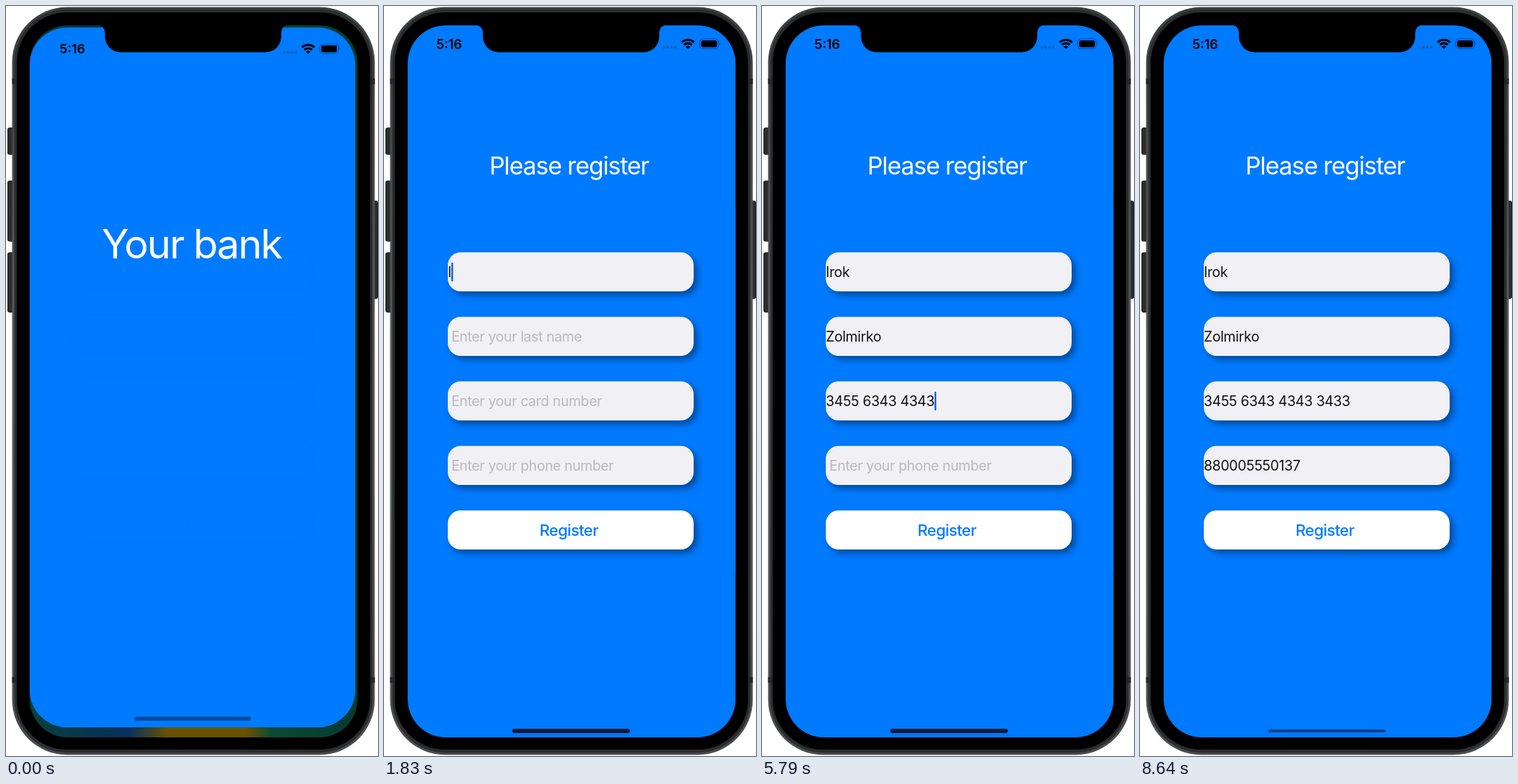
Recreate the animation shown at these times as an HTML page. Size 519 px wide and 1046 px high, loop 8670 ms.

```html
<!DOCTYPE html>
<html lang="en">
<head>
<meta charset="utf-8">
<title>Bank registration</title>
<style>
  html, body { margin: 0; width: 100%; height: 100%; overflow: hidden; background: #fff; }
  svg { display: block; width: 519px; height: 1046px; }
  text { font-family: Inter, Roboto, sans-serif; white-space: pre; }

  .screen, .content, .title, .bar, .box, .tint, #tone stop { animation: 8670ms linear infinite; }
  .screen { transform-origin: 33px 203px; animation-name: open-screen; }
  .content { transform-origin: 227px 333px; animation-name: open-content; }
  .title { animation-name: leave; font-size: 57px; letter-spacing: -2px; fill: url(#tone); }
  #tone .top { animation-name: cool; }
  .bar { transform-origin: 261px 1011px; animation-name: bar; }

  .tint { animation-name: tint; }
  .head { font-size: 34px; letter-spacing: -1.1px; --mid: #1ba9ff; --end: #fff; }
  .box { animation-name: tint, shade; --mid: #14acff; --end: #f1f0f5; }
  .button { --end: #fff; }
  .hint, .typed { font-size: 19.4px; letter-spacing: -.3px; }
  .hint { --mid: #0c89dc; --end: #b9b9be; }
  .typed { fill: #111; }
  .action { font-size: 22px; font-weight: 500; letter-spacing: -.6px; fill: #007aff; }
  .clock { font-size: 18px; font-weight: 600; }
  .caret { fill: #0b62dc; }
  .mark { fill: #bcd4ea; }

  @keyframes open-screen {
    0%, .69% { transform: scale(.993, .983); }
    3.11%, 100% { transform: none; }
  }
  @keyframes open-content {
    0%, .69% { transform: scale(.988, .975); }
    3.11%, 100% { transform: none; }
  }
  @keyframes tint {
    0%, 2.77% { fill: #007aff; }
    3.81%, 4.49% { fill: var(--mid); }
    5.54%, 100% { fill: var(--end); }
  }
  @keyframes shade {
    0%, 2.77% { filter: drop-shadow(5px 5px 5px rgba(0, 0, 0, 0)); }
    3.81%, 4.49% { filter: drop-shadow(5px 5px 5px rgba(0, 0, 0, .13)); }
    5.54%, 100% { filter: drop-shadow(5px 5px 5px rgba(0, 0, 0, .4)); }
  }
  @keyframes cool {
    0%, 2.77% { stop-color: #fff; }
    3.81%, 100% { stop-color: #7cc8ff; }
  }
  @keyframes leave {
    0%, 4.49% { opacity: 1; }
    5.54%, 100% { opacity: 0; }
  }
  @keyframes bar {
    0%, .69% { fill: #0048a0; transform: none; }
    3.11%, 99.2% { fill: #0d1c38; transform: none; }
    99.3%, 100% { fill: #0b3f86; transform: scaleY(.7); }
  }
</style>
</head>
<body>
<svg viewBox="0 0 519 1046">
  <defs>
    <linearGradient id="tone" gradientUnits="userSpaceOnUse" x1="0" y1="318" x2="0" y2="343">
      <stop class="top" offset=".3" stop-color="#fff"/>
      <stop offset="1" stop-color="#fff"/>
    </linearGradient>
    <linearGradient id="home">
      <stop offset="0" stop-color="#064038"/>
      <stop offset=".3" stop-color="#07305c"/>
      <stop offset=".42" stop-color="#685200"/>
      <stop offset=".66" stop-color="#685200"/>
      <stop offset=".74" stop-color="#0b4a32"/>
      <stop offset="1" stop-color="#063a30"/>
    </linearGradient>
    <linearGradient id="rim" x2="0" y2="1">
      <stop offset="0" stop-color="#3d3f40"/>
      <stop offset=".5" stop-color="#5c5e5f"/>
      <stop offset="1" stop-color="#4a4c4d"/>
    </linearGradient>
    <clipPath id="glass"><rect x="33" y="27" width="457.500" height="993" rx="53"/></clipPath>
  </defs>

  <g fill="#2b2e30" stroke="#17191a">
    <rect x="2.500" y="170" width="10" height="37" rx="2"/>
    <rect x="2.500" y="244" width="10" height="84" rx="2"/>
    <rect x="2.500" y="344" width="10" height="83" rx="2"/>
    <rect x="508" y="272" width="10.500" height="136" rx="2"/>
  </g>
  <rect x="8.500" y="1.500" width="506" height="1043" rx="77" fill="url(#rim)"/>
  <rect x="11.500" y="4.500" width="500" height="1037" rx="74" fill="#2a2c2d"/>
  <g fill="#242627">
    <rect x="8.500" y="101" width="7" height="8"/>
    <rect x="507.500" y="101" width="7" height="8"/>
    <rect x="8.500" y="936" width="7" height="8"/>
    <rect x="507.500" y="936" width="7" height="8"/>
  </g>
  <rect x="15" y="9" width="493" height="1028" rx="70"/>

  <g clip-path="url(#glass)">
    <rect x="33" y="27" width="458" height="993" fill="url(#home)"/>
    <rect class="screen" x="33" y="27" width="457.500" height="993" rx="53" fill="#007aff"/>
    <g class="content">
      <text class="clock" x="73" y="59.500">5:16</text>
      <g fill="#1763bd">
        <circle cx="390.500" cy="57.500" r="2"/><circle cx="395.700" cy="57.500" r="2"/>
        <circle cx="400.900" cy="57.500" r="2"/><circle cx="406.100" cy="57.500" r="2"/>
      </g>
      <g fill="none" stroke="#000" stroke-width="3">
        <path d="M415.200 50.600A13 13 0 0 1 432.800 50.600M418.600 54.200A8 8 0 0 1 429.400 54.200"/>
        <path d="M424 60l-3.200-3.200a4.600 4.600 0 0 1 6.400 0z" fill="#000" stroke="none"/>
      </g>
      <rect x="440.500" y="46" width="26" height="13.500" rx="4" fill="none" stroke="#0a4da3"/>
      <rect x="442.500" y="48" width="22" height="9.500" rx="2.500"/>
      <path d="M468 50.500q2 2 0 4.500z" fill="#0a4da3"/>

      <text class="head tint" x="147" y="235">Please register</text>
      <g id="form"></g>
      <rect class="box button" x="89" y="703.500" width="343" height="54.500" rx="18"/>
      <text class="action" x="217" y="739">Register</text>
      <text class="title" x="132" y="352">Your bank</text>
      <rect class="bar" x="179" y="1008" width="164" height="6" rx="3"/>
    </g>
  </g>
  <path d="M126 26Q138 27 138 38V42A22 22 0 0 0 160 64.500H362A22 22 0 0 0 384 42V38Q384 27 396 26Z"/>
</svg>

<script>
  const LOOP = 8670;
  const form = document.getElementById('form');

  // Times in ms: focus gained, first key, gap between keys, focus lost.
  const fields = [
    { hint: 'Enter a name', value: 'Irok', focus: 1650, first: 1800, gap: 150, blur: 2800 },
    { hint: 'Enter your last name', value: 'Zolmirko', focus: 2800, first: 3180, gap: 140, blur: 4330, marked: true },
    { hint: 'Enter your card number', value: '3455 6343 4343 3433', focus: 4330, first: 4590, gap: 90, blur: 6990 },
    { hint: 'Enter your phone number', value: '880005550137', focus: 6990, first: 7200, gap: 105, blur: 8520 }
  ];

  function add(tag, cls, attrs) {
    const el = document.createElementNS('http://www.w3.org/2000/svg', tag);
    el.setAttribute('class', cls);
    for (const key in attrs) el.setAttribute(key, attrs[key]);
    return form.appendChild(el);
  }

  fields.forEach((f, i) => {
    const y = 343.5 + 90 * i;
    add('rect', 'box', { x: 89, y, width: 343, height: 54.5, rx: 18 });
    f.mark = add('rect', 'mark', { x: 89, y: y + 13.5, height: 28 });
    f.hintText = add('text', 'hint tint', { x: 94, y: y + 34.5 });
    f.hintText.textContent = f.hint;
    f.text = add('text', 'typed', { x: 89, y: y + 34.5 });
    f.caret = add('rect', 'caret', { y: y + 14.5, width: 2.4, height: 26 });
  });

  function show(el, on) {
    el.style.visibility = on ? 'visible' : 'hidden';
  }

  function drawField(f, t) {
    const keys = Math.floor((t - f.first) / f.gap) + 1;
    const count = Math.max(0, Math.min(f.value.length, keys));
    const lastKey = count ? f.first + (count - 1) * f.gap : f.focus;
    const active = t >= f.focus && t < f.blur;
    f.text.textContent = f.value.slice(0, count);
    const width = count ? f.text.getComputedTextLength() : 0;
    f.caret.setAttribute('x', 89 + width);
    f.mark.setAttribute('width', width);
    show(f.hintText, !count);
    show(f.caret, active && (t - lastKey) % 1000 < 550);
    show(f.mark, f.marked && active && count > 1 && count < f.value.length);
  }

  const start = performance.now();
  function draw() {
    const t = (performance.now() - start) % LOOP;
    fields.forEach(f => drawField(f, t));
    requestAnimationFrame(draw);
  }
  draw();
</script>
</body>
</html>
```
